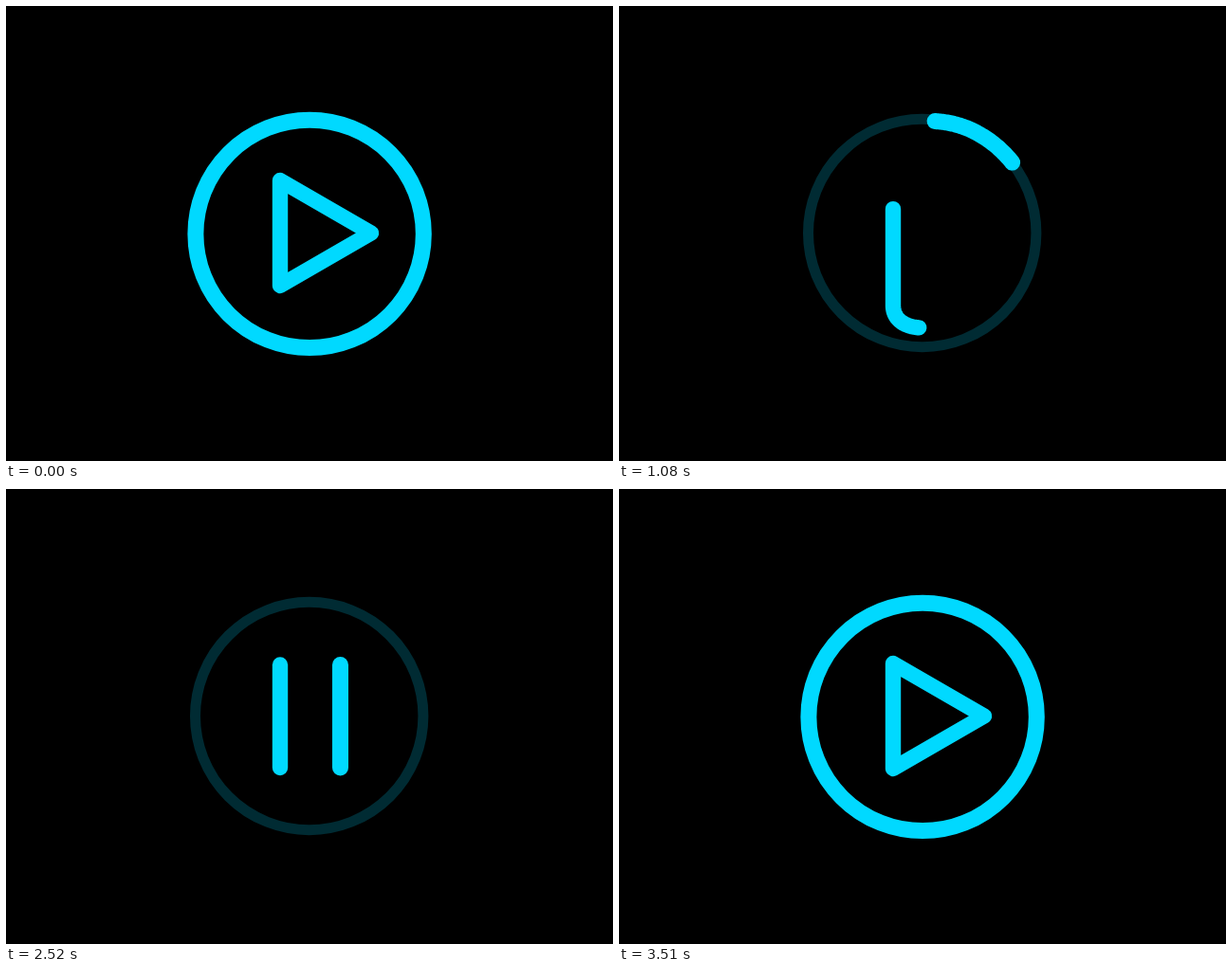
An HTML page with a canvas that plays this animation: 640 px wide and 480 px high, repeating every 4470 ms.

```html
<!DOCTYPE html>
<html>
<head>
<meta charset="utf-8">
<style>
html, body { margin: 0; width: 100%; height: 100%; overflow: hidden; background: #000; }
canvas { display: block; }
</style>
</head>
<body>
<canvas id="stage" width="640" height="480"></canvas>
<script>
const ctx = document.getElementById('stage').getContext('2d');
const LOOP = 4470, STEP = 30;
const BRIGHT = '#00d9ff', FAINT = '#002b33';
const R = 120.2, LAP = 2 * Math.PI * R;

// A route is a polyline with its running length and a mark at the end of each part.
class Route {
  constructor(x, y) {
    this.x = x;
    this.y = y;
    this.length = 0;
    this.marks = [];
    this.path = new Path2D();
    this.path.moveTo(x, y);
  }
  step(x, y) {
    this.length += Math.hypot(x - this.x, y - this.y);
    this.x = x;
    this.y = y;
    this.path.lineTo(x, y);
  }
  mark() {
    this.marks.push(this.length);
    return this;
  }
  line(x, y) {
    this.step(x, y);
    return this.mark();
  }
  curve(x1, y1, x2, y2, x3, y3) {
    const x0 = this.x, y0 = this.y;
    const at = (a, b, c, d, u) => {
      const v = 1 - u;
      return v * v * v * a + 3 * v * v * u * b + 3 * v * u * u * c + u * u * u * d;
    };
    for (let i = 1; i <= 40; i++) {
      const u = i / 40;
      this.step(at(x0, x1, x2, x3, u), at(y0, y1, y2, y3, u));
    }
    return this.mark();
  }
  // Counterclockwise, in degrees clockwise from the top.
  arc(cx, cy, from, sweep) {
    for (let a = 0; a <= sweep; a++) this.step(...onRing(cx, cy, from - a));
    return this.mark();
  }
}

function onRing(cx, cy, degrees) {
  const a = degrees * Math.PI / 180;
  return [cx + R * Math.sin(a), cy - R * Math.cos(a)];
}

const inOut = power => u => u < 0.5
  ? Math.pow(2 * u, power) / 2
  : 1 - Math.pow(2 - 2 * u, power) / 2;
const quad = inOut(2), cubic = inOut(3);

function tween(from, to, start, duration, ease) {
  return t => from + (to - from) * ease(Math.min(1, Math.max(0, (t - start) / duration)));
}

// Ring to left bar
const ringOut = new Route(...onRing(320.4, 239.7, 103))
  .arc(320.4, 239.7, 103, 438)
  .curve(357, 124.3, 342, 121.3, 325, 121.3)
  .curve(300, 121.3, 289, 145, 289, 185.5)
  .line(289, 294);

// Triangle to right bar
const triangleOut = new Route(289, 184)
  .line(289, 295)
  .line(385, 239.5)
  .line(289, 184)
  .line(289, 316)
  .curve(289, 331, 302, 339.5, 320.7, 339.5)
  .curve(339.5, 339.5, 352.5, 331, 352.5, 316)
  .line(352.5, 294)
  .line(352.5, 185.5);

// Right bar to ring
const ringIn = new Route(352.5, 294)
  .line(352.5, 185.5)
  .line(352.5, 178)
  .curve(352.5, 150, 340, 126.2, 308, 126.2)
  .curve(288, 126.2, 266, 131, ...onRing(320, 240.3, -37))
  .arc(320, 240.3, -37, 360);

// Left bar to triangle
const triangleIn = new Route(289, 185.5)
  .line(289, 294)
  .line(289, 295)
  .line(337, 267.25)
  .line(385, 239.5)
  .line(289, 184)
  .line(289, 295)
  .line(337, 267.25);

const toPause = [
  {
    route: ringOut, width: 17,
    tail: tween(0, ringOut.marks[2], 388, 1071, cubic),
    head: tween(LAP, ringOut.length, 314, 1527, cubic)
  },
  {
    route: triangleOut, width: 16.4,
    tail: tween(0, triangleOut.marks[6], 629, 823, cubic),
    head: tween(triangleOut.marks[2], triangleOut.length, 322, 1527, cubic)
  }
];

const toPlay = [
  {
    route: ringIn, width: 17,
    tail: tween(0, ringIn.marks[3], 2551, 693, cubic),
    head: tween(ringIn.marks[0], ringIn.length, 2577, 927, cubic)
  },
  {
    route: triangleIn, width: 16.4,
    tail: tween(0, triangleIn.marks[2], 2520, 670, quad),
    head: tween(triangleIn.marks[0], triangleIn.length, 2551, 962, quad)
  }
];
// The moving triangle tail comes to rest halfway along the lower side.
toPlay[1].tail = tween(0, triangleIn.marks[2], 2520, 670, quad);

function circle(x, y, width, color) {
  ctx.beginPath();
  ctx.arc(x, y, R, 0, 2 * Math.PI);
  ctx.lineWidth = width;
  ctx.strokeStyle = color;
  ctx.stroke();
}

function drawStroke({ route, width, tail, head }, t) {
  const from = tail(t);
  ctx.setLineDash([head(t) - from, 5000]);
  ctx.lineDashOffset = -from;
  ctx.lineWidth = width;
  ctx.strokeStyle = BRIGHT;
  ctx.stroke(route.path);
  ctx.setLineDash([]);
}

function drawPlay() {
  circle(320.1, 240.4, 17, BRIGHT);
  ctx.beginPath();
  ctx.moveTo(289, 184);
  ctx.lineTo(385, 239.5);
  ctx.lineTo(289, 295);
  ctx.closePath();
  ctx.lineWidth = 16.4;
  ctx.stroke();
}

function draw(t) {
  ctx.fillStyle = '#000';
  ctx.fillRect(0, 0, 640, 480);
  ctx.lineCap = ctx.lineJoin = 'round';
  circle(319.7, 239.5, 11, FAINT);
  if (t < 300 || t >= 3510) drawPlay();
  else (t < 2520 ? toPause : toPlay).forEach(s => drawStroke(s, t));
}

const origin = performance.now();
function frame() {
  const t = (performance.now() - origin) % LOOP;
  draw(Math.floor(t / STEP) * STEP);
  requestAnimationFrame(frame);
}
frame();
</script>
</body>
</html>
```
